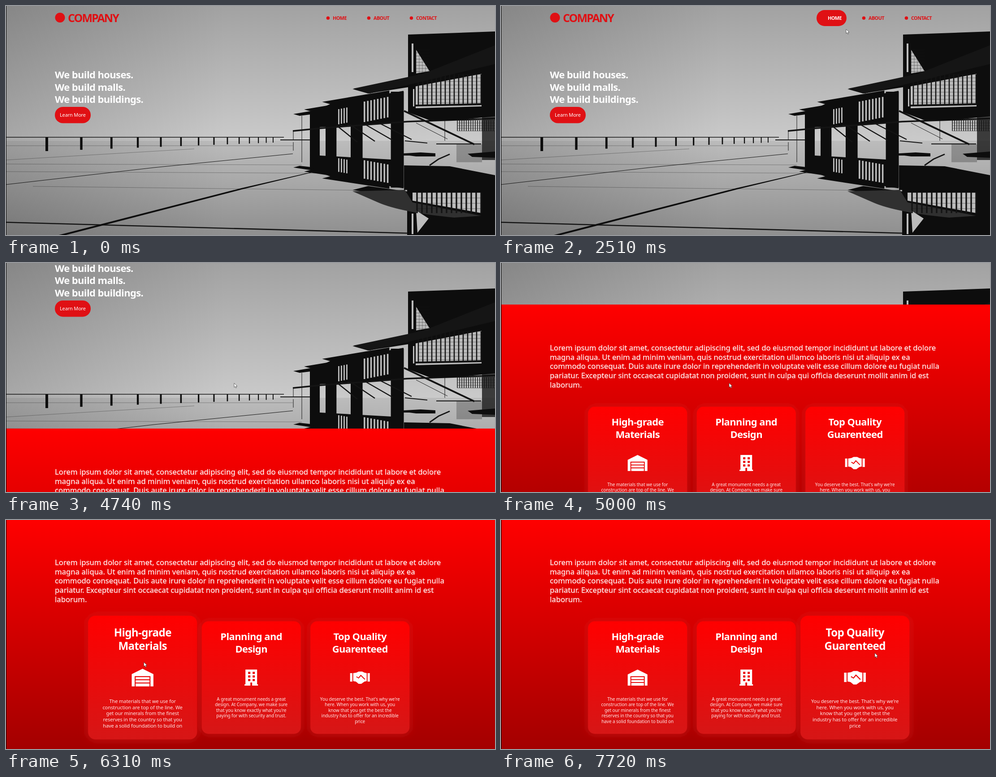
An HTML page that plays this animation: 1091 by 513 pixels, repeating every 8000 ms.

```html
<!DOCTYPE html>
<html lang="en">
<head>
<meta charset="utf-8">
<title>Company</title>
<style>
  html, body { margin: 0; width: 100%; height: 100%; overflow: hidden; background: #000; }
  svg { display: block; font-family: "Noto Sans", "Open Sans", sans-serif; }
  .bold { font-weight: 700; }
  .title { font-size: 22px; letter-spacing: -.62px; fill: #fff; }
  .brand { font-size: 25px; letter-spacing: -1.95px; fill: #e01014; }
  .nav { font-size: 10.8px; letter-spacing: -.55px; }
  .lead { font-size: 16.74px; fill: #ffeaea; stroke: #ffeaea; stroke-width: .3px; }
  .copy { font-size: 10px; letter-spacing: -.07px; fill: #ffeaea; }
  .mid { text-anchor: middle; }
  .dark { fill: #0d0d0d; }
  .light { fill: #bcbcbc; }
  .line { fill: none; stroke: #141414; }
</style>
</head>
<body>
<svg width="1091" height="513" viewBox="0 0 1091 513">
  <defs>
    <linearGradient id="sky" x2="0" y2="1"><stop stop-color="#a2a2a2"/><stop offset="1" stop-color="#cacaca"/></linearGradient>
    <linearGradient id="floor" x2="0" y2="1"><stop stop-color="#bcbcbc"/><stop offset="1" stop-color="#8f8f8f"/></linearGradient>
    <linearGradient id="shade"><stop stop-opacity=".17"/><stop offset=".45" stop-opacity="0"/></linearGradient>
    <linearGradient id="wall" x2="0" y2="1"><stop stop-color="#f00"/><stop offset="1" stop-color="#8b0000"/></linearGradient>
    <linearGradient id="panel" x2="0" y2="1"><stop stop-color="#f00"/><stop offset="1" stop-color="#d61616"/></linearGradient>
    <filter id="blur" x="-20%" y="-20%" width="140%" height="140%"><feGaussianBlur stdDeviation="9"/></filter>
  </defs>

  <g id="photo">
    <rect width="1091" height="302" fill="url(#sky)"/>
    <rect y="302" width="1091" height="211" fill="url(#floor)"/>
    <rect width="1091" height="513" fill="url(#shade)"/>
    <g class="line">
      <path d="M0 294H620" stroke-width="1.3"/>
      <path d="M0 345L420 320M0 354L660 356M0 371L780 375M60 404L890 414M0 313H640" stroke-width=".8" opacity=".45"/>
      <path d="M0 400L330 362L640 331" stroke-width="1.1"/>
      <path d="M0 484.5L897 509" stroke-width="2.6"/>
      <path class="dark" d="M110 515H126L526 411L790 347L525 408Z" stroke="none"/>
    </g>
    <g id="posts" class="dark"></g>
    <g id="wing" class="dark"><path d="M678 240L727 218L887 190V260L678 273Z"/></g>
    <use href="#wing" transform="translate(0 579.5) scale(1 -.9)"/>

    <g class="line">
      <path d="M640 280L700 274L895 259L1091 252" stroke-width="3.5"/>
      <path id="stairs" stroke-width="2.5"/>
      <path d="M888 235L1045 310" stroke-width="4"/>
      <path d="M915 262L985 298M641 280V300M660 246V350M979 255V302M641 305V324" stroke-width="1"/>
      <path d="M612 300H678M890 302L940 307M960 309H1060" stroke-width="2"/>
    </g>

    <path class="dark" d="M897 64L1091 57V247L990 257L945 256L897 238Z"/>
    <path class="light" d="M905 84H909V148H905ZM915 98L945 146L915 151ZM908 186h3V225h-3ZM914 180L1061 152V218L914 221ZM914 225L1061 222V225L914 229Z"/>
    <path class="dark" d="M1062 245H1091V345H1062Z" opacity=".75"/>
    <path class="dark" d="M1005 310H1062V350H1005Z" opacity=".25"/>
    <path class="dark" d="M873 331L925 328L958 330V337H915L900 335H873ZM1030 331L1091 326V340L1040 338Z"/>
    <path class="line" d="M990 332L965 343L945 357" stroke-width="3"/>
    <path class="dark" d="M888 357L990 359L1091 379V513H895V412H888Z"/>
    <path fill="#303030" d="M773 415L890 412L907 440L1060 470L1000 474Q880 462 830 440Z"/>
    <path class="light" d="M907 418H1061V464L907 436ZM915 458L943 476L918 508ZM905 465h4V511h-4Z"/>
    <g id="bars" class="line"></g>
    <path fill="#151515" d="M775 185L930 152L1091 88V130L900 176L812 196Z"/>
  </g>

  <g id="top">
    <circle cx="120.5" cy="26" r="11" fill="#e01014"/>
    <text class="bold brand" x="138" y="36">COMPANY</text>
    <rect x="109" y="226" width="80" height="36.5" rx="18" fill="#e01014"/>
    <text x="120" y="248.3" font-size="11" letter-spacing="-.17" fill="#fff">Learn More</text>
  </g>

  <g id="about"><rect width="1091" height="650" fill="url(#wall)"/></g>
  <rect width="1" height="513" fill="#000"/>
  <g id="cursor" fill="#fff" stroke="#333" stroke-width=".7">
    <path id="arrow" d="M0 0V9.5L2.2 7.6L3.8 11L5.4 10.2L3.9 7H7Z"/>
    <path id="hand" d="M1 1Q2.2 -.6 3.4 1V4L8 5Q9.2 5.4 9 7L8 12H2.5L-1.6 8Q-1.4 6 1 7.5Z"/>
  </g>
</svg>

<script>
const LOOP = 8000, RED = [224, 16, 20];
const $ = id => document.getElementById(id);
const mix = (a, b, p) => a + (b - a) * p;
const clamp = p => Math.min(1, Math.max(0, p));
const smooth = p => p * p * (3 - 2 * p);

function add(parent, tag, attrs, text) {
  const el = document.createElementNS("http://www.w3.org/2000/svg", tag);
  set(el, attrs);
  if (text) el.textContent = text;
  return parent.appendChild(el);
}

function set(el, attrs) {
  for (const k in attrs) el.setAttribute(k, attrs[k]);
}

function lines(parent, cls, x, y, step, rows) {
  rows.forEach((row, i) => add(parent, "text", { class: cls, x, y: y + i * step }, row));
}

// cubic-bezier(.25, .1, .25, 1)
function ease(p) {
  p = clamp(p);
  let lo = 0, hi = 1;
  for (let i = 0; i < 20; i++) {
    const u = (lo + hi) / 2;
    if (.75 * u * (1 - u) + u ** 3 < p) lo = u; else hi = u;
  }
  return .3 * lo * (1 - lo) ** 2 + 3 * lo * lo * (1 - lo) + lo ** 3;
}

// Hover amount from [enter, leave] spans
const hover = (t, spans, ms) => spans.reduce(
  (sum, [on, off]) => sum + ease((t - on) / ms) - ease((t - off) / ms), 0);

// Railing posts, closer and smaller with distance
for (let i = 0; i < 14; i++) {
  const near = .874 ** i, w = 1 + 5 * near;
  add($("posts"), "rect", { x: 91 + 611 * (1 - near) - w / 2, y: 294, width: w, height: 8 + 23 * near });
}

// Four stepped roofs, each on its column
for (let i = 0; i < 4; i++) {
  const x = 641 + 24 * (1.68 ** i - 1) / .68, y = 242 - .425 * (x - 641), len = 70 + 40 * i;
  add($("wing"), "path", { d: `M${x} ${y}l${len} ${-.17 * len}v${9 + 3 * i}L${x + 14 + 7 * i} ${y + 4 + 2 * i}Z` });
  const left = 678 + 35 * (1.6 ** i - 1) / .6, top = 240 - 16 * i;
  add($("wing"), "rect", { x: left, y: top, width: 22 + 2.3 * i, height: 305 - top });
}

function slats(x0, x1, step, y, h) {
  for (let x = x0; x < x1; x += step)
    add($("wing"), "rect", { class: "light", x, y: y - (x - x0) * .2, width: step * .48, height: h });
}
slats(741, 764, 6, 231, 34);
slats(798, 856, 7.4, 214, 46);

$("stairs").setAttribute("d", [738, 768, 799, 832].map((x, i) => `M${x} ${268 - 2 * i}l${46 + 9 * i} 37`).join(""));

function grid(x0, x1, dx, y0, y1, dy, w) {
  let cols = "", rows = "";
  for (let x = x0; x <= x1; x += dx) cols += `M${x} ${y0}V${y1}`;
  for (let y = y0; y <= y1; y += dy) rows += `M${x0} ${y}H${x1}`;
  add($("bars"), "path", { d: cols, "stroke-width": w });
  add($("bars"), "path", { d: rows, "stroke-width": .5 });
}
grid(920, 1061, 10, 153, 222, 8, 2.6);
grid(915, 945, 7, 98, 150, 7, .4);
grid(1007, 1091, 5, 256, 280, 6, 1.5);
grid(917, 1061, 11, 418, 464, 12, 3.4);

lines($("top"), "bold title", 109, 162, 27.6,
  ["We build houses.", "We build malls.", "We build buildings."]);

const nav = [
  ["HOME", 729, 760, [[1920, 2510]]],
  ["ABOUT", 820, 856, [[2880, 3440]]],
  ["CONTACT", 915, 962.5, [[3740, 4080]]]
].map(([label, x, right, spans]) => ({
  x, right, spans,
  pill: add($("top"), "rect", { fill: `rgb(${RED})` }),
  text: add($("top"), "text", { class: "bold nav", x, y: 31 }, label)
}));

lines($("about"), "lead", 109, 103, 20.65, [
  "Lorem ipsum dolor sit amet, consectetur adipiscing elit, sed do eiusmod tempor incididunt ut labore et dolore",
  "magna aliqua. Ut enim ad minim veniam, quis nostrud exercitation ullamco laboris nisi ut aliquip ex ea",
  "commodo consequat. Duis aute irure dolor in reprehenderit in voluptate velit esse cillum dolore eu fugiat nulla",
  "pariatur. Excepteur sint occaecat cupidatat non proident, sunt in culpa qui officia deserunt mollit anim id est",
  "laborum."
]);

let panes = "";
for (let i = 0; i < 6; i++) panes += `M${i % 2 ? 3 : -7} ${-13 + 8 * (i >> 1)}v5h5v-5Z`;

const icons = {
  depot: "M-22 18V-7L0 -18L22 -7V18H16V-3H-16V18ZM-14 -1h28v4.5h-28ZM-14 5.5h28v4.5h-28ZM-14 12h28v6h-28Z",
  tower: "M-13 -18H13V15H15V18H2V11H-2V18H-15V15H-13Z" + panes,
  shake: "M-22 -10H-17V9H-22ZM17 -10H22V9H17ZM-15 -10L-8 -11L-3 -13.5H5L10 -11L15 -10V8L10 9L3 14H-3L-9 9L-15 8Z"
};

const cards = [
  ["depot", [[5960, 6850]], ["High-grade", "Materials"],
    ["The materials that we use for", "construction are top of the line. We", "get our minerals from the finest",
     "reserves in the country so that you", "have a solid foundation to build on"]],
  ["tower", [[5400, 5920], [6860, 7270]], ["Planning and", "Design"],
    ["A great monument needs a great", "design. At Company, we make sure", "that you know exactly what you're",
     "paying for with security and trust."]],
  ["shake", [[7290, LOOP * 2]], ["Top Quality", "Guarenteed"],
    ["You deserve the best. That's why we're", "here. When you work with us, you", "know that you get the best the",
     "industry has to offer for an incredible", "price"]]
].map(([icon, spans, title, copy], i) => {
  const g = add($("about"), "g");
  const box = { x: -110.5, y: -126, width: 221, height: 252, rx: 15 };
  add(g, "rect", { ...box, fill: "#d81a1a", opacity: .75, filter: "url(#blur)" });
  add(g, "rect", { ...box, fill: "url(#panel)" });
  lines(g, "bold title mid", 0, -84, 27.6, title);
  add(g, "path", { d: icons[icon], fill: "#fff", "fill-rule": "evenodd" });
  if (icon === "shake")
    add(g, "path", { d: "M-8 -2L-3 1L2 -5L11 4", fill: "none", stroke: "#ec0a0a", "stroke-width": 2 });
  lines(g, "copy mid", 0, 51.5, 12.6, copy);
  return { g, x: 304.7 + 242.5 * i, spans };
});

// Pointer stops: time, x, y
const stops = [
  [130, 976, 486], [900, 474, 338], [1200, 367, 250], [1710, 705, 71], [2100, 740, 28], [2510, 770, 52],
  [3000, 838, 30], [3400, 862, 46], [4080, 932, 39], [4500, 509, 269], [5100, 509, 269],
  [5400, 508, 265], [5910, 422, 252], [6350, 305, 320], [7010, 509, 279], [7600, 834, 298]
];

function pointer(t) {
  const i = stops.findIndex(s => s[0] > t);
  if (i < 1) return stops.at(i).slice(1);
  const [t0, x0, y0] = stops[i - 1], [t1, x1, y1] = stops[i];
  const p = smooth((t - t0) / (t1 - t0));
  return [mix(x0, x1, p), mix(y0, y1, p)];
}

function render(t) {
  const scroll = 515 * clamp((t - 4608) / 482);
  set($("top"), { transform: `translate(0 ${-scroll})` });
  set($("about"), { transform: `translate(0 ${513 - scroll})` });

  // Each dot grows into a pill
  for (const { x, right, spans, pill, text } of nav) {
    const p = hover(t, spans, 250), height = mix(7.5, 36, p);
    set(pill, {
      x: mix(x - 14.3, x - 25, p), y: 27 - height / 2,
      width: mix(7.5, right - x + 36, p), height, rx: height / 2
    });
    set(text, { fill: `rgb(${RED.map(c => Math.round(mix(c, 255, p)))})` });
  }

  for (const { g, x, spans } of cards)
    set(g, { transform: `translate(${x} 355) scale(${1 + .1 * hover(t, spans, 300)})` });

  const pointing = nav.some(n => n.spans.some(([on, off]) => t >= on && t < off - 5));
  set($("cursor"), { transform: `translate(${pointer(t)})`, visibility: t < 130 ? "hidden" : "visible" });
  $("arrow").style.display = pointing ? "none" : "";
  $("hand").style.display = pointing ? "" : "none";
}

const start = performance.now();
function tick() {
  render((performance.now() - start) % LOOP);
  requestAnimationFrame(tick);
}
tick();
</script>
</body>
</html>
```
